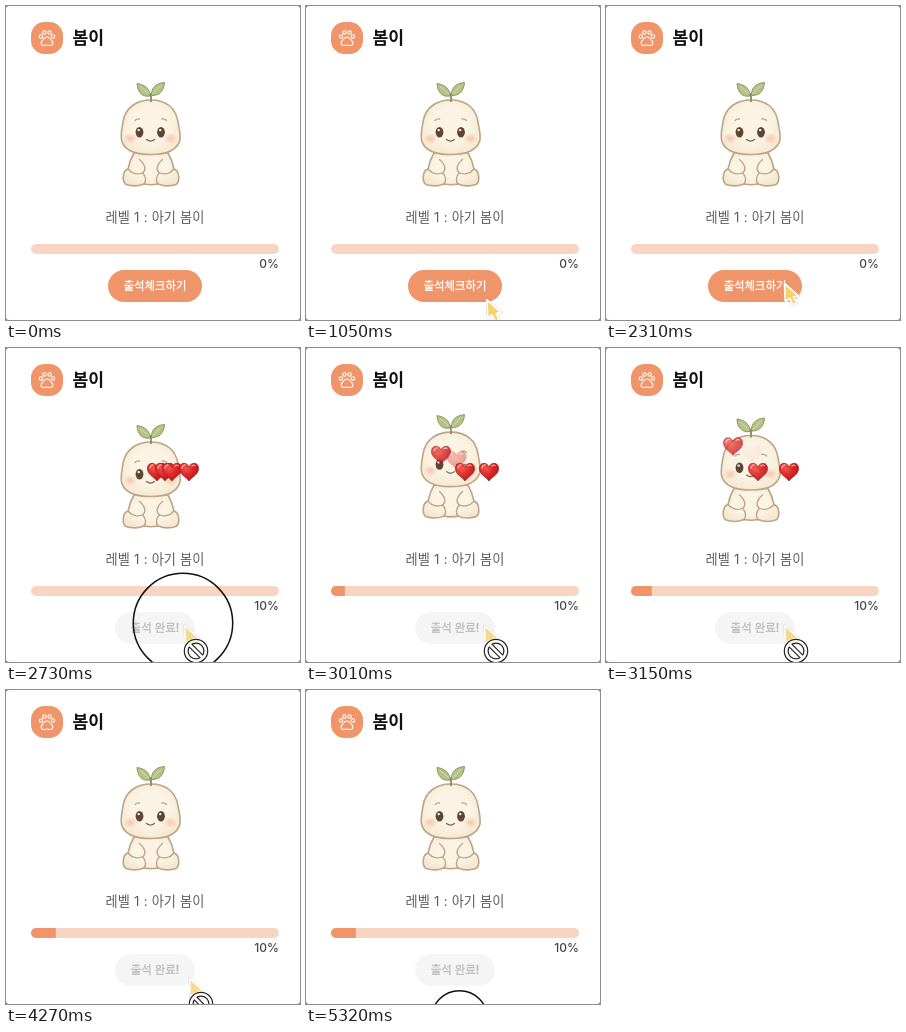
Write an HTML page that moves like this. It is 294 px wide and 314 px high and loops after 5390 ms.

```html
<!DOCTYPE html>
<html lang="ko">
<head>
<meta charset="utf-8">
<title>출석체크</title>
<style>
  html, body { margin: 0; width: 100%; height: 100%; overflow: hidden; background: #777; }
  svg { display: block; width: 100vw; height: 100vh; }
  text { font-family: Inter, "Noto Sans CJK KR", "Noto Sans CJK", sans-serif; }
  .skin { fill: url(#cream); stroke: #bda587; stroke-width: 1.6; stroke-linecap: round; stroke-linejoin: round; }
  .fold { fill: none; stroke: #bda587; stroke-width: 1.4; stroke-linecap: round; }
  .leaf { fill: #b3c486; stroke: #85905c; stroke-width: .9; stroke-linejoin: round; }
  .line { fill: none; stroke: #7d624b; stroke-width: 1.2; stroke-linecap: round; }
</style>
</head>
<body>
<svg viewBox="0 0 294 314">
  <defs>
    <radialGradient id="cream" cx=".5" cy=".45" r=".62">
      <stop offset=".5" stop-color="#fbf4e4"/><stop offset="1" stop-color="#f3e6cd"/>
    </radialGradient>
    <radialGradient id="blush">
      <stop offset=".2" stop-color="#f6c0ab" stop-opacity=".75"/><stop offset="1" stop-color="#f6c0ab" stop-opacity="0"/>
    </radialGradient>
    <radialGradient id="red" cx=".35" cy=".3" r=".75">
      <stop offset="0" stop-color="#f0554c"/><stop offset=".45" stop-color="#de2a29"/><stop offset="1" stop-color="#b3141b"/>
    </radialGradient>
    <clipPath id="track"><rect x="25" y="238" width="248" height="10" rx="5"/></clipPath>
    <g id="heart">
      <path d="M0 9C-3 5-9.600 2.500-9.600-3.400C-9.600-9.800-2.200-10.400 0-5C2.200-10.400 9.600-9.800 9.600-3.400C9.600 2.500 3 5 0 9Z" fill="url(#red)" stroke="#9c191c" stroke-width=".7"/>
      <path d="M-7-4Q-6.500-7-4-7M3-6.200Q4.500-7.400 6-6.500" fill="none" stroke="#ffb3a8" stroke-width="1.300" stroke-linecap="round"/>
    </g>
    <g id="eye">
      <ellipse rx="3.900" ry="5.300" fill="#5f4632"/>
      <circle cx="-.8" cy="-2.200" r="1.200" fill="#fff"/>
    </g>
    <g id="limb">
      <path class="fold" d="M133.500 153.500C138 157 141 163 137 166.500C133 169 126 168 122.500 163.500"/>
      <path class="fold" d="M136.500 167C140 170 140.500 175 138 178"/>
    </g>
  </defs>

  <rect width="294" height="314" rx="3" fill="#fff"/>

  <rect x="25" y="16" width="32" height="32" rx="13.500" fill="#f0946a"/>
  <g fill="none" stroke="#fff" stroke-width="1.100">
    <circle cx="35" cy="30.500" r="1.700"/><circle cx="38.400" cy="26.500" r="1.700"/>
    <circle cx="43.600" cy="26.500" r="1.700"/><circle cx="47" cy="30.500" r="1.700"/>
    <path d="M41 31C43.600 31 44.200 33.200 45.600 34.500C48.200 36.800 46.600 40.200 43.800 39.400C42 38.800 40 38.800 38.200 39.400C35.400 40.200 33.800 36.800 36.400 34.500C37.800 33.200 38.400 31 41 31Z"/>
  </g>
  <text x="66.500" y="37.700" font-size="17.200" font-weight="700" fill="#111">봄이</text>

  <g id="pet">
    <path class="skin" d="M128 147C125 152 123 158 122 163C116 165 116 176 120 178.500C126 180.500 133 180 138 178Q145 179.500 152 178C157 180 164 180.500 170 178.500C174 176 174 165 168 163C167 158 165 152 162 147Z"/>
    <use href="#limb"/>
    <use href="#limb" transform="matrix(-1 0 0 1 290 0)"/>
    <path class="skin" d="M145 94C160 94 170 102 172 116C173 122 174.800 128 174 134C171 145 160 148.500 145 148.500C130 148.500 118 145 115.500 134C114.500 128 116 122 117 116C119 102 130 94 145 94Z"/>
    <path d="M145 96Q145.500 91 144.500 87" fill="none" stroke="#8f8c5c" stroke-width="1.800"/>
    <path class="leaf" d="M144 90C136 91.500 131.500 86 131 77.500C139 78.500 144 83 144 90Z"/>
    <path class="leaf" d="M145.500 89.500C145 82 150 77 158.500 76.500C158 85 153 90 145.500 89.500Z"/>
    <path d="M143 88L134 80.500M146.500 88L155 79.500" stroke="#d9e2b8" stroke-width=".8"/>
    <ellipse cx="124.500" cy="132.500" rx="7" ry="5.500" fill="url(#blush)"/>
    <ellipse cx="164.500" cy="132.500" rx="7" ry="5.500" fill="url(#blush)"/>
    <path d="M129 114.500Q131 112.500 133.500 113M156 113Q159 112.500 160.500 114.500" class="fold"/>
    <use href="#eye" x="133.500" y="126.300"/>
    <use href="#eye" x="155" y="126.300" id="openEye"/>
    <path id="wink" class="line" d="M150.500 126Q155 130 159.500 126"/>
    <path class="line" d="M140.500 133.500Q144.500 136.800 148.500 133.500"/>
  </g>
  <g id="hearts"></g>

  <text x="149" y="215.700" font-size="13.200" word-spacing=".5" fill="#5c5c5c" text-anchor="middle">레벨 1 : 아기 봄이</text>
  <g clip-path="url(#track)">
    <rect x="25" y="238" width="248" height="10" fill="#f8d5c2"/>
    <rect id="fill" x="25" y="238" height="10" fill="#f0946a"/>
  </g>
  <text id="percent" x="273" y="261.600" font-size="12" font-weight="500" fill="#444" text-anchor="end"></text>

  <rect id="button" y="264" height="32" rx="16"/>
  <text id="label" x="149" y="284.200" font-size="11.400" font-weight="500" stroke-width=".3" text-anchor="middle"></text>

  <g id="cursor">
    <path id="arrow" d="M.3.3L1.300 19L5.600 15.500L9 22L12.800 20L9.600 14L15 13.200Z" fill="#f7d06a" stroke="#fff" stroke-width="1.800" stroke-linejoin="round" style="filter:drop-shadow(0 .5px .7px #0007)"/>
    <g id="blocked" transform="translate(12 26)" fill="none">
      <circle r="9.800" stroke="#222" stroke-width="5"/>
      <path d="M-6-6L6 6" stroke="#222" stroke-width="5"/>
      <circle r="9.800" stroke="#fff" stroke-width="2.600"/>
      <path d="M-7-7L7 7" stroke="#fff" stroke-width="2.600"/>
    </g>
  </g>
  <circle id="ring" fill="none" stroke="#111" stroke-width="1.500"/>
</svg>

<script>
const LOOP = 5390, STEP = 70, CHECKED = 2730;
const $ = id => document.getElementById(id);
const set = (el, attrs) => { for (const k in attrs) el.setAttribute(k, attrs[k]); };
const show = (el, on) => set(el, { visibility: on ? "visible" : "hidden" });
const clamp = v => Math.min(1, Math.max(0, v));
const easeInOut = p => p * p * (3 - 2 * p);

// [time, x, y] of the pointer tip
const pointerPath = [
  [630, 175, 316], [910, 179, 301], [1190, 182, 286], [1470, 181, 280], [1750, 178, 277.5],
  [1820, 178, 277], [3850, 178, 277], [4060, 180, 280], [4270, 183, 288], [4340, 184, 293],
  [4410, 182, 300], [4480, 181, 305], [4550, 178, 310], [4620, 177, 318]
];
// [start, end, x, y, radius]
const rings = [
  [2100, 2310, 177, 275, 28.7], [2590, 2730, 177, 275, 40.7],
  [2730, 2800, 177, 275, 49.7], [5320, 5390, 153.5, 329, 28.2]
];
// start x, delay, drift per second (x, y), fade per second
const hearts = [
  { x: 183, delay: 420, vx: -40, vy: -50, fade: 1 },
  { x: 166, delay: 140, vx: -50, vy: 0, fade: .3 },
  { x: 159, delay: 0, vx: -30, vy: -42, fade: 2.3 },
  { x: 151, delay: 0, vx: -57, vy: -61, fade: .6 }
];
for (const heart of hearts) {
  heart.el = document.createElementNS("http://www.w3.org/2000/svg", "use");
  set(heart.el, { href: "#heart" });
  $("hearts").prepend(heart.el);
}

function pointAt(path, t) {
  const i = path.findIndex(p => p[0] > t);
  if (i < 1) return null;
  const [t0, x0, y0] = path[i - 1], [t1, x1, y1] = path[i];
  const p = (t - t0) / (t1 - t0);
  return [x0 + (x1 - x0) * p, y0 + (y1 - y0) * p];
}

function draw(t) {
  const since = t - CHECKED, done = since >= 0;
  const jumping = done && since < 600;

  const lift = jumping ? 10 * easeInOut(1 - Math.abs(since - 300) / 300) : 0;
  set($("pet"), { transform: `translate(0 ${-lift})` });
  show($("openEye"), !jumping);
  show($("wink"), jumping);

  show($("hearts"), jumping);
  for (const { el, x, delay, vx, vy, fade } of hearts) {
    const s = Math.max(0, since - delay) / 1000;
    set(el, { transform: `translate(${x + vx * s} ${124 + vy * s})`, opacity: clamp(1 - fade * s) });
  }

  set($("fill"), { width: 24.8 * clamp(since / 500) });
  $("percent").textContent = done ? "10%" : "0%";
  set($("button"), done ? { x: 109, width: 80, fill: "#f5f5f5" } : { x: 102, width: 94, fill: "#f0946a" });
  const ink = done ? "#bcbcbc" : "#fff";
  $("label").textContent = done ? "출석 완료!" : "출석체크하기";
  set($("label"), { fill: ink, stroke: ink });

  const tip = pointAt(pointerPath, t);
  show($("cursor"), tip);
  if (tip) set($("cursor"), { transform: `translate(${tip})` });
  const blocked = done && tip && tip[1] < 296;
  set($("blocked"), { display: blocked ? "inline" : "none" });
  set($("arrow"), { opacity: blocked ? .75 : 1 });

  const ring = rings.find(([start, end]) => t >= start && t < end);
  show($("ring"), ring);
  if (ring) set($("ring"), { cx: ring[2], cy: ring[3], r: ring[4] });
}

const begin = performance.now();
function tick() {
  const t = (performance.now() - begin) % LOOP;
  draw(Math.floor(t / STEP) * STEP);
  requestAnimationFrame(tick);
}
tick();
</script>
</body>
</html>
```
